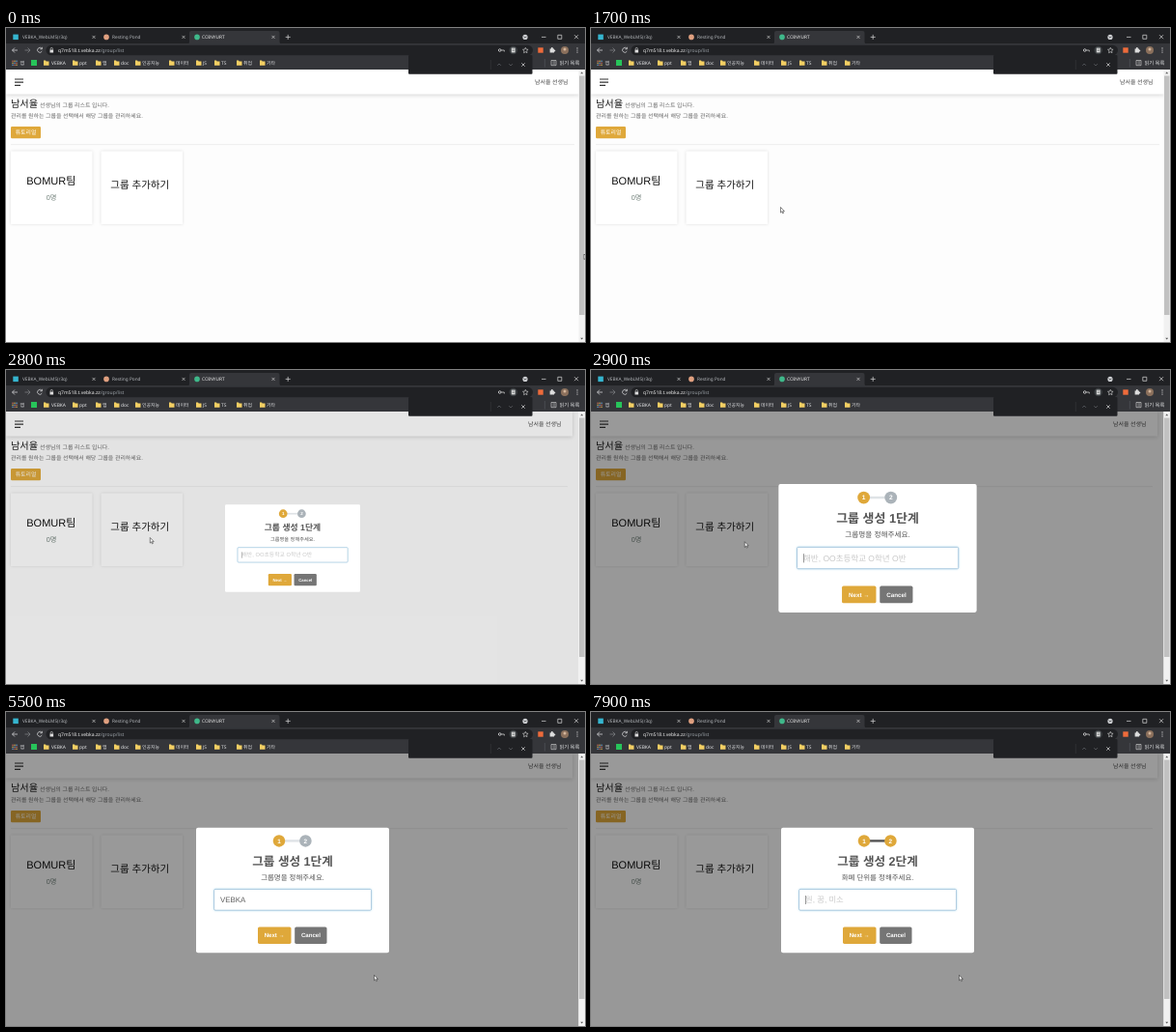
An HTML page that plays this animation: 600x325 px, repeating every 8 s.

```html
<!DOCTYPE html>
<html lang="ko">
<head>
<meta charset="utf-8">
<title>Group list</title>
<style>
html, body { margin: 0; width: 100%; height: 100%; overflow: hidden; background: #fdfdfd; }
svg { display: block; width: 100vw; height: 100vh; }
text { font-family: "Liberation Sans", "Noto Sans CJK KR", "Noto Sans CJK JP", sans-serif; text-rendering: geometricPrecision; white-space: pre; }
#chrome text { font-family: "Noto Sans", "Noto Sans CJK KR", "Noto Sans CJK JP", sans-serif; }
.card { fill: #fff; filter: drop-shadow(0 0 1.6px rgba(0,0,0,.13)); }
.card.hover { filter: drop-shadow(0 0 1.6px rgba(0,0,0,.24)); }
#bar { fill: #fff; filter: drop-shadow(0 1px 2px rgba(0,0,0,.16)); }
#field { fill: #fff; stroke: #a3c4dc; stroke-width: .9; filter: drop-shadow(0 0 1px #c4e6f5); }
</style>
</head>
<body>
<svg viewBox="0 0 600 325" preserveAspectRatio="none">
  <g id="page"></g>
  <rect id="shade" y="43" width="593.5" height="282"/>
  <g id="popup"></g>
  <g id="scroll"></g>
  <g id="chrome"></g>
  <path id="cursor" d="M0 0V5.6L1.3 4.4L2.2 6.4L3 6L2.2 4.1H3.9Z" fill="#fff" stroke="#222" stroke-width=".55"/>
</svg>
<script>
const $ = id => document.getElementById(id);
const GOLD = '#dfa83a';

// y is the vertical middle of the text
const text = (x, y, str, size, fill, more = '') =>
  `<text x="${x}" y="${y + size * .36}" font-size="${size}" fill="${fill}" ${more}>${str}</text>`;
const mid = (x, y, str, size, fill, more = '') => text(x, y, str, size, fill, 'text-anchor="middle" ' + more);
const box = (x, y, w, h, fill, more = '') =>
  `<rect x="${x}" y="${y}" width="${w}" height="${h}" fill="${fill}" ${more}/>`;
const dot = (x, y, r, fill, more = '') => `<circle cx="${x}" cy="${y}" r="${r}" fill="${fill}" ${more}/>`;
const line = (d, color, w = .7) => `<path d="${d}" fill="none" stroke="${color}" stroke-width="${w}"/>`;
const cross = (x, y, r, color) => line(`M${x - r} ${y - r}l${2 * r} ${2 * r}m0 ${-2 * r}l${-2 * r} ${2 * r}`, color);

$('page').innerHTML =
  box(0, 43, 600, 282, '#fdfdfd') +
  '<rect id="bar" y="43" width="594" height="25.5"/>' +
  line('M9 53H18M9 56.2H18M9 59.4H15', '#333', 1.2) +
  text(548, 56, '남서율 선생님', 5.95, '#444', 'id="user"') +
  text(5, 78, '남서율', 10.2, '#111') +
  text(35, 79.8, '선생님의 그룹 리스트 입니다.', 5.93, '#666') +
  text(5, 91.3, '관리를 원하는 그룹을 선택해서 해당 그룹을 관리하세요.', 5.93, '#666') +
  box(5, 102, 31, 12.3, GOLD, 'rx="1.2"') +
  mid(20.5, 108, '튜토리얼', 5.9, '#fff') +
  '<rect id="rule" x="5" y="120.5" width="584" height=".6" fill="#e4e4e4"/>' +
  '<rect class="card" x="5" y="127.5" width="84.5" height="75.5"/>' +
  '<rect class="card" id="add" x="98.5" y="127.5" width="84.5" height="75.5"/>' +
  mid(46.8, 158.5, 'BOMUR팀', 11, '#111') +
  mid(47, 175, '0명', 7.2, '#6f7f78') +
  mid(138.7, 162.3, '그룹 추가하기', 10.5, '#111');

$('scroll').innerHTML =
  box(593.5, 43, 6.5, 282, '#f1f1f1') + box(594, 49.5, 5.5, 247.5, '#c1c1c1') +
  '<path d="M595.2 47.3h3l-1.5-1.8zM595.2 320.7h3l-1.5 1.8z" fill="#555"/>';

const tabs = [[10, 17, 91, 'VEBKA_WebLMS(r3q)', '#35b5cf'], [104, 110, 184, 'Resting Pond', '#e0a080'], [198, 203, 277, 'COINYURT', '#3fb88a']];
const marks = [[39, 47, 'VEBKA'], [69, 76, 'ppt'], [93, 100, '앱'], [112, 119, 'doc'], [134, 141, '인공지능'],
  [169, 176, '데이터'], [197, 204, 'JS'], [216, 223, 'TS'], [239, 246, '취업'], [263, 270, '기타']];
const folder = x => `<path d="M${x} 33.6h2l.7 .8h2.8v4.4h-5.5z" fill="#f3cf63"/>`;

$('chrome').innerHTML =
  box(0, 0, 600, 16.5, '#202124') + box(0, 16, 600, 27, '#35363a') +
  '<path d="M188 16.5q2 0 2-2V5q0-2 2-2H281.500q2 0 2 2v9.500q0 2 2 2z" fill="#35363a"/>' +
  tabs.map(([x, tx, cx, name, color], i) =>
    (i ? dot(x, 9.4, 2.8, color) : box(x - 2.7, 6.6, 5.5, 5.5, color)) +
    text(tx, 9.4, name, 4.75, i > 1 ? '#f1f1f1' : '#b4b7bb') + cross(cx, 9.4, 1.5, '#ccc')).join('') +
  line('M289.700 9.400h5M292.200 6.900v5M555 9.400h4.500M571.800 7.300h4v4h-4z', '#ddd') +
  dot(538, 9.4, 2.6, '#cfd1d4') + line('M536.600 8.800l1.400 1.400 1.400-1.400', '#202124') + cross(591, 9.2, 2, '#ddd') +
  line('M12 23H6.500M9 20.500L6.500 23L9 25.500', '#e2e3e5') +
  line('M19.500 23H25M22.500 20.500L25 23L22.500 25.500', '#85878a') +
  line('M37 21.200A2.500 2.500 0 1 0 37.300 24M37.400 19.800V21.800H35.300', '#e2e3e5') +
  box(41.5, 17.7, 504.5, 10.6, '#202124', 'rx="5.3"') +
  box(45.5, 22.5, 3.6, 3, '#ddd') + line('M46.200 22.500v-1a1.100 1.100 0 0 1 2.200 0v1', '#ddd', .6) +
  text(54, 23, 'q7m518.t.vebka.zz<tspan fill="#9aa0a6">/group/list</tspan>', 5, '#eee') +
  dot(511.7, 23, 1.3, 'none', 'stroke="#ddd" stroke-width=".8"') + line('M513 23H516.300V24.500', '#ddd') +
  dot(525.7, 23, 4.2, '#3c4043') + box(523.8, 20.6, 3.8, 4.8, '#ddd') + line('M524.700 22h2M524.700 23.500h2', '#3c4043', .5) +
  line('M538.300 20.300l.8 1.800 2 .2-1.500 1.400.4 2-1.700-1-1.700 1 .4-2-1.500-1.400 2-.2z', '#ddd', .6) +
  box(551.3, 20.3, 5.4, 5.4, '#ee6b3b') +
  box(563.6, 21.5, 4.4, 4, '#ddd') + dot(565.8, 21.2, 1.1, '#ddd') + dot(568.2, 23.5, 1.1, '#ddd') +
  dot(579, 23, 4, '#8b705c') + dot(579, 22, 1.5, '#d3b59b') +
  [20.9, 23, 25.1].map(y => dot(592, y, .6, '#ddd')).join('') +
  [0, 1, 2].map(i => [0, 1, 2].map(j => dot(7 + i * 2, 34.3 + j * 2, .7, ['#e0705f', '#e8c15a', '#6faee0'][(i + j) % 3])).join('')).join('') +
  text(14.5, 36.2, '앱', 5, '#e2e3e5') + box(26, 33, 6, 6, '#27c45a') +
  marks.map(([x, tx, name]) => folder(x) + text(tx, 36.2, name, 4.9, '#e2e3e5')).join('') +
  line('M558.300 32V40.500', '#5f6368', .5) +
  line('M565 33.500h5v5.200h-5zM566.500 35h2.500M566.500 37h2.500', '#ddd', .6) +
  text(573.5, 36.2, '읽기 목록', 5.3, '#e2e3e5') +
  box(417, 28, 128.5, 19.7, '#202124', 'rx="1"') +
  line('M502.300 33V43', '#3c4043', .5) +
  line('M509.300 38.800l1.800-1.800 1.800 1.800M521.300 37.200l1.800 1.800 1.800-1.800', '#686b70') + cross(536, 38, 1.7, '#ddd');

$('popup').innerHTML =
  box(197, 119.7, 200, 129.5, '#fff', 'rx="2"') +
  '<rect id="link" x="288" y="132.200" width="17" height="2.400"/>' +
  dot(283, 133.4, 6.25, GOLD) + dot(310.4, 133.4, 6.25, GOLD, 'id="second"') +
  mid(283, 133.4, '1', 6.4, '#fff', 'font-weight="700"') + mid(310.4, 133.4, '2', 6.4, '#fff', 'font-weight="700"') +
  mid(297, 154, '', 12.6, '#555', 'id="title" font-weight="700"') +
  mid(297, 171, '', 7.45, '#545454', 'id="ask"') +
  '<rect id="field" x="215.600" y="183.400" width="163" height="21.800" rx="1.300"/>' +
  text(222, 194.3, '', 8.3, '#c8c8c8', 'id="hint"') +
  text(222, 194.3, '', 7.9, '#606060', 'id="typed"') +
  '<rect id="caret" y="190" width=".6" height="9" fill="#555"/>' +
  box(261, 222.5, 34.5, 17.4, GOLD, 'rx="1.600"') + mid(278.2, 231.2, 'Next →', 6.1, '#fff', 'font-weight="700"') +
  box(299.2, 222.5, 33.3, 17.4, '#757575', 'rx="1.600"') + mid(315.9, 231.2, 'Cancel', 6.1, '#fff', 'font-weight="700"');

const clamp = p => Math.max(0, Math.min(1, p));
const route = [[0, 599, 234], [900, 576, 266.5], [1700, 196.5, 185.5], [1900, 176, 180], [2800, 149.3, 173.5], [3600, 381.5, 272.3], [8000, 381.5, 272.3]];
const keyTimes = [3900, 4400, 4600, 4800, 5000];
const bounce = [[0, .7], [.45, 1.05], [.8, .95], [1, 1]];

function pointer(t) {
  const i = route.findIndex(r => t < r[0]);
  const [t0, x0, y0] = route[i - 1], [t1, x1, y1] = route[i];
  const p = (t - t0) / (t1 - t0), e = p * p * (3 - 2 * p);
  return [x0 + (x1 - x0) * e, y0 + (y1 - y0) * e];
}

function popScale(p) {
  if (p >= 1) return 1;
  const i = bounce.findIndex(b => p < b[0]);
  const [p0, s0] = bounce[i - 1], [p1, s1] = bounce[i];
  const q = 1 - (p - p0) / (p1 - p0);
  return s0 + (s1 - s0) * (1 - q * q);
}

function draw(t) {
  const open = t >= 2800, two = t >= 5800;
  $('cursor').setAttribute('transform', `translate(${pointer(t)})`);
  $('add').classList.toggle('hover', t >= 1900 && !open);
  $('shade').setAttribute('fill-opacity', .4 * clamp((t - 2775) / 100));
  // the open dialog pads the page on the right
  $('user').setAttribute('x', open ? 541 : 548);
  $('bar').setAttribute('width', open ? 587 : 594);
  $('rule').setAttribute('width', open ? 577 : 584);

  $('popup').style.display = open ? '' : 'none';
  if (!open) return;
  const s = popScale((t - (two ? 5765 : 2800)) / 300);
  $('popup').setAttribute('transform', `translate(297 184.5) scale(${s}) translate(-297 -184.5)`);
  $('link').setAttribute('fill', two ? '#555' : '#dfe3e6');
  $('second').setAttribute('fill', two ? GOLD : '#abb3b9');
  $('title').textContent = `그룹 생성 ${two ? 2 : 1}단계`;
  $('ask').textContent = two ? '화폐 단위를 정해주세요.' : '그룹명을 정해주세요.';
  const typed = two ? '' : 'VEBKA'.slice(0, keyTimes.filter(k => t >= k).length);
  $('typed').textContent = typed;
  $('hint').textContent = typed ? '' : two ? '원, 꿈, 미소' : '해반, OO초등학교 O학년 O반';
  const lit = two ? t < 6300 || (t >= 6900 && t < 7400) || t >= 7900 : t < 3300 || (t >= 3700 && t < 5500);
  $('caret').style.display = lit ? '' : 'none';
  $('caret').setAttribute('x', 222 + (typed ? $('typed').getComputedTextLength() : 0));
}

function tick(now) {
  draw(Math.floor(now % 8000 / 100) * 100);
  requestAnimationFrame(tick);
}
tick(performance.now());
</script>
</body>
</html>
```
